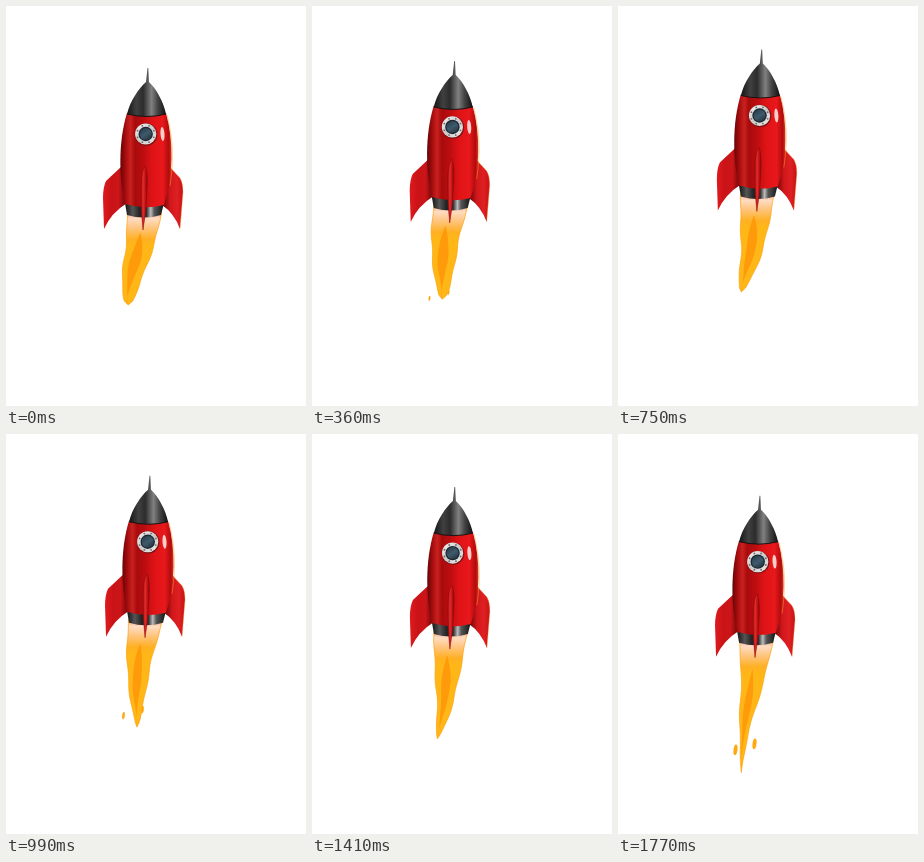
Recreate the animation shown at these times as an HTML page with a canvas. Size 300 by 400 pixels, loop 1.8 s.

```html
<!DOCTYPE html>
<html>
<head>
<meta charset="utf-8">
<title>Rocket</title>
<style>
html, body { margin: 0; width: 100%; height: 100%; overflow: hidden; background: #fff; }
canvas { display: block; }
</style>
</head>
<body>
<canvas id="stage" width="300" height="400"></canvas>
<script>
const ctx = document.getElementById('stage').getContext('2d');
const LOOP = 1800, STEP = 30, PEAK = 930, RISE = 21;
const PUFF = 600, DRIP_START = 330, DRIP_LIFE = 420;
const TURN = 2 * Math.PI;

// height gained: a gentle ease up to the peak and back down
function liftAt(t) {
  const p = t < PEAK ? t / PEAK : (LOOP - t) / (LOOP - PEAK);
  return RISE * (p - Math.sin(TURN * p) / (2 * TURN));
}

function gradient(x0, y0, x1, y1, ...stops) {
  const g = ctx.createLinearGradient(x0, y0, x1, y1);
  stops.forEach(([p, c]) => g.addColorStop(p, c));
  return g;
}

function shape(d, fill, stroke, width = 1) {
  const p = new Path2D(d);
  if (fill) { ctx.fillStyle = fill; ctx.fill(p); }
  if (stroke) { ctx.strokeStyle = stroke; ctx.lineWidth = width; ctx.stroke(p); }
}

function oval(x, y, rx, ry, fill, turn = 0) {
  ctx.fillStyle = fill;
  ctx.beginPath();
  ctx.ellipse(x, y, rx, ry, turn, 0, TURN);
  ctx.fill();
}

// band between two edge functions, k running from 'from' to 1
function band(from, left, right, fill, stroke) {
  const n = 24, ks = Array.from({ length: n + 1 }, (_, i) => from + (1 - from) * i / n);
  ctx.beginPath();
  ks.forEach(k => ctx.lineTo(...left(k)));
  ks.reverse().forEach(k => ctx.lineTo(...right(k)));
  ctx.closePath();
  ctx.fillStyle = fill;
  ctx.fill();
  if (stroke) { ctx.strokeStyle = stroke; ctx.lineWidth = 1; ctx.stroke(); }
}

// each puff stretches further than the one before, then snaps back
function drawFlame(t, lift) {
  const puff = Math.floor(t / PUFF), u = t % PUFF / PUFF;
  const stretch = 20 * u * (puff + .1);
  const top = 206 - lift, length = 93 + stretch;
  const thin = .45 + stretch / 60;

  // side runs from -1 (left edge) to 1 (right edge)
  const point = (k, side) => {
    const sway = 4.5 * k * Math.cos(TURN * (u - .06 - .56 * k));
    const half = 17 * Math.pow(1 - k, thin);
    const ripple = 1.6 * k * (1 - k) * Math.sin(15 * k - 2 * TURN * u + side);
    return [138.5 + lift / 20 - 13 * k + sway + side * (half + 2 * ripple), top + length * k];
  };

  for (let n = 0; n <= puff; n++) {
    const age = t - n * PUFF - DRIP_START;
    if (age <= 0 || age >= DRIP_LIFE) continue;
    const size = Math.sqrt(Math.sin(Math.PI * age / DRIP_LIFE));
    for (const side of [-1, 1])
      oval(127 + side * 9.5, top + 88 - 3 * side + .08 * age, 2 * size, 5.5 * size, '#ffa812', .12);
  }

  const glow = gradient(0, top, 0, top + 34,
    [0, '#f2a078'], [.2, '#ffdcc2'], [.45, '#ffc684'], [.8, '#ffb022'], [1, '#ffb718']);
  band(0, k => point(k, -1), k => point(k, 1), glow, 'rgba(255,160,10,.7)');
  band(.22,
    k => point(k, -.1 - .45 * Math.sin(4 * (k - .22))),
    k => point(k, -.1 + .45 * Math.sin(5 * (k - .22))), '#ff9b0a');
}

function drawRocket() {
  // side fins
  shape('M116 160L100 175Q97 181 97 192L98 223Q105 207 121 197Z',
    gradient(97, 0, 121, 0, [0, '#df1a1e'], [.35, '#c91317'], [.65, '#cc1518'], [1, '#620507']));
  shape('M164 161L174 172Q177 177 177 186L174 223Q168 207 156 199Z',
    gradient(157, 0, 177, 0, [0, '#6e0507'], [.35, '#d0171a'], [.7, '#e02023'], [1, '#c51114']));
  shape('M165 163L174 172Q177 177 177 186L174 223', null, 'rgba(255,160,45,.6)', .6);

  // lower ring
  shape('M119 197L121 209Q138 214 155 209L158 197Z',
    gradient(119, 0, 158, 0, [0, '#141414'], [.2, '#555'], [.38, '#222'], [.55, '#303030'],
      [.66, '#bbb'], [.75, '#555'], [1, '#111']));

  // body
  shape('M121 107C112 136 113 172 119 198Q138 204 158 199C167.5 170 168 136 160 107Z',
    gradient(114, 0, 166, 0, [0, '#600506'], [.1, '#a30b0d'], [.2, '#c9211f'], [.29, '#a80b0d'],
      [.45, '#bd0d10'], [.62, '#df1316'], [.82, '#e8181b'], [.94, '#b00b0d'], [1, '#e0401e']));
  shape('M161 109C167 132 168 153 164 180', null, 'rgba(255,160,45,.7)', .7);
  oval(156.5, 128, 2, 7, 'rgba(255,225,220,.9)', -.07);

  // nose
  shape('M141.5 62L142.3 62L143 76C150 82 158 97 160 108Q141 113 121 108C124 95 133 82 140 76Z',
    gradient(122, 0, 160, 0, [0, '#191919'], [.22, '#404040'], [.4, '#2c2c2c'],
      [.62, '#808080'], [.78, '#454545'], [1, '#101010']));
  shape('M121 108Q141 113 160 108', null, '#1b1112', 1);

  // window
  oval(140.2, 128.5, 11.2, 11.2, '#7d1113');
  oval(139.7, 128, 10.6, 10.6, gradient(131, 118, 149, 138, [0, '#f2f2f2'], [.5, '#c9c9c9'], [1, '#ededed']));
  for (let i = 0; i < 8; i++) {
    const a = (i + .5) * TURN / 8;
    oval(139.7 + 8.8 * Math.cos(a), 128 + 8.8 * Math.sin(a), .9, .9, '#77676a');
  }
  oval(139.7, 128, 7.2, 7.2, '#1c2730');
  oval(139.7, 128, 6, 6, gradient(136, 122, 144, 134, [0, '#293d4b'], [.5, '#3e5a6c'], [1, '#24323d']));

  // centre fin
  shape('M139 160Q135 165 135 185Q135 207 137 224Q140 207 141 185Q142 165 139 160Z',
    gradient(134, 0, 142, 0, [0, '#8d080a'], [.4, '#e22c2b'], [.65, '#c51114'], [1, '#6d0507']), '#8c090b', .5);
}

function frame(now) {
  const t = Math.floor(now % LOOP / STEP) * STEP;
  const lift = liftAt(t);
  ctx.fillStyle = '#fff';
  ctx.fillRect(0, 0, 300, 400);
  drawFlame(t, lift);
  ctx.save();
  ctx.translate(lift / 10, -lift);
  drawRocket();
  ctx.restore();
  requestAnimationFrame(frame);
}
requestAnimationFrame(frame);
</script>
</body>
</html>
```
